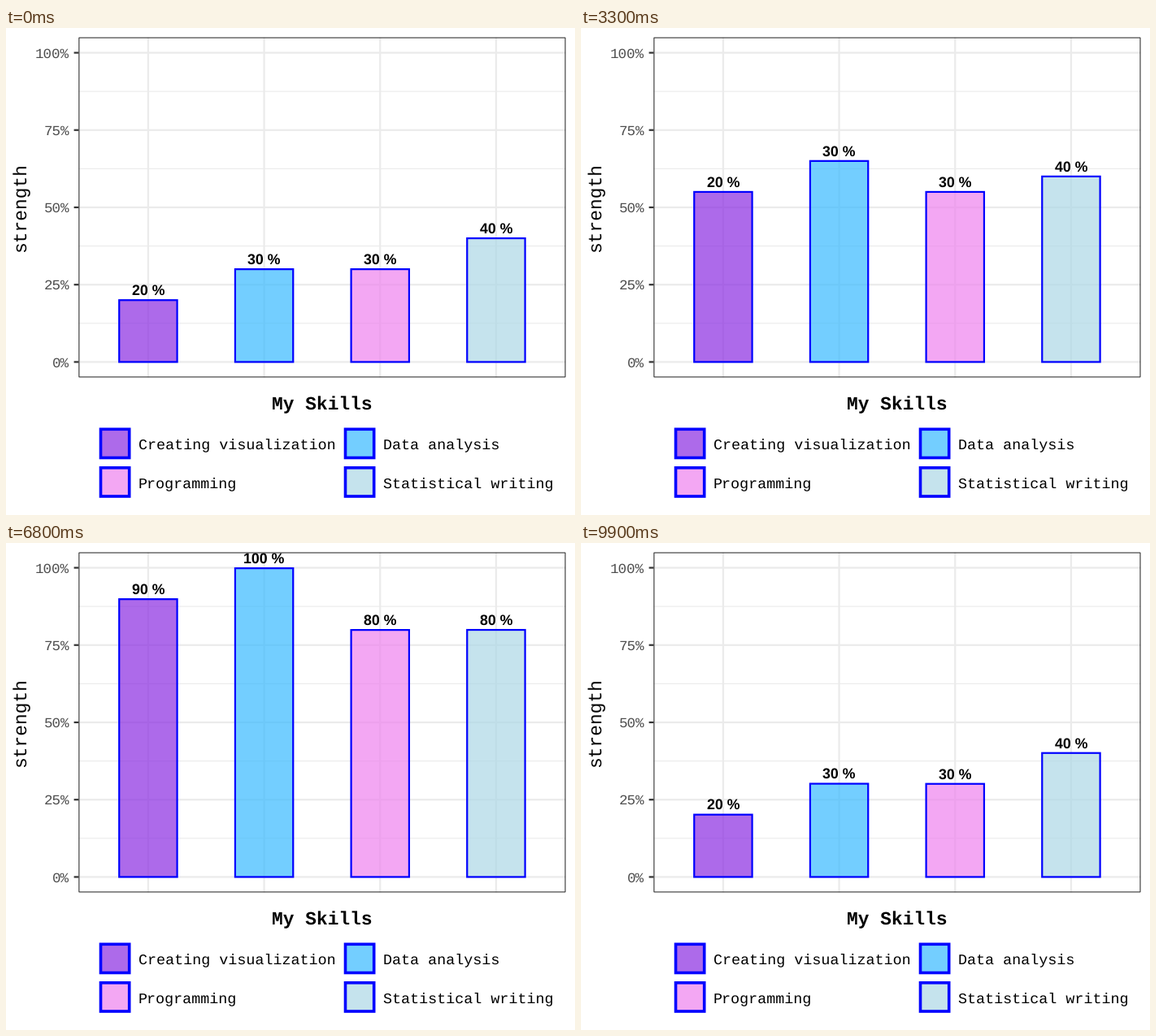
Recreate the animation shown at these times as a matplotlib script. Size 700 by 600 pixels, loop 10000 ms.

```python
import math

import matplotlib.pyplot as plt
from matplotlib.animation import FuncAnimation
from matplotlib.colors import to_rgba
from matplotlib.patches import Rectangle

WIDTH, HEIGHT, DPI = 700, 600, 150
FRAMES, INTERVAL = 100, 100
PX = 72 / DPI

LEFT, RIGHT, TOP, BOTTOM = 89.3, 688.54, 11.46, 430.5
STEP = (RIGHT - LEFT) / 4.2
LINE = 2.22 * PX
GRID = "#ebebeb"
MONO = "Liberation Mono"

SKILLS = [
    ("Creating visualization", "#8a2be2", 20, 90),
    ("Data analysis", "#38baff", 30, 100),
    ("Programming", "#ee82ee", 30, 80),
    ("Statistical writing", "#add8e6", 40, 80),
]

plt.rcParams["text.hinting"] = "none"
fig = plt.figure(figsize=(WIDTH / DPI, HEIGHT / DPI), dpi=DPI, facecolor="white")
ax = fig.add_axes([0, 0, 1, 1])
ax.set_xlim(0, WIDTH)
ax.set_ylim(HEIGHT, 0)
ax.axis("off")


def x_pos(index):
    return LEFT + (0.6 + index) * STEP


def y_pos(percent):
    return BOTTOM - (percent + 5) / 110 * (BOTTOM - TOP)


def line(xs, ys, color, width, zorder=1):
    ax.plot(xs, ys, color=color, lw=width, zorder=zorder,
            solid_capstyle="butt", snap=False)


def box(x, y, w, h, fill, edge, width, zorder=3):
    return ax.add_patch(Rectangle((x, y), w, h, facecolor=fill, edgecolor=edge,
                                  lw=width, joinstyle="miter", snap=False,
                                  zorder=zorder))


def text(x, y, string, size, family=MONO, **style):
    return ax.text(x, y, string, fontsize=size, family=family,
                   va="baseline", **style)


# Panel with grid, ticks and border
for percent in (12.5, 37.5, 62.5, 87.5):
    line([LEFT, RIGHT], [y_pos(percent)] * 2, GRID, LINE / 2)
for percent in range(0, 101, 25):
    y = y_pos(percent)
    line([LEFT, RIGHT], [y, y], GRID, LINE)
    line([LEFT - 5.7, LEFT], [y, y], "#333333", LINE)
    text(78, y + 5.9, f"{percent}%", 8.4, color="#4d4d4d", ha="right")
for index in range(4):
    line([x_pos(index)] * 2, [TOP, BOTTOM], GRID, LINE)
box(LEFT + 0.55, TOP + 0.55, RIGHT - LEFT - 1.1, BOTTOM - TOP - 1.1,
    "none", "#333333", LINE / 2, zorder=5)

# Titles
text((LEFT + RIGHT) / 2, 470, "My Skills", 11, weight="bold", ha="center")
text(24.5, (TOP + BOTTOM) / 2, "strength", 11, ha="center",
     rotation=90, rotation_mode="anchor")

# Bars and legend
bars, labels = [], []
panel = Rectangle((LEFT, TOP), RIGHT - LEFT, BOTTOM - TOP, transform=ax.transData)
for index, (name, color, low, high) in enumerate(SKILLS):
    fill = to_rgba(color, 0.7)
    bars.append(box(x_pos(index) - STEP / 4, y_pos(0), STEP / 2, 0,
                    fill, "blue", LINE))
    label = text(x_pos(index), 0, "", 8.54, "Liberation Sans",
                 weight="bold", ha="center", zorder=4)
    label.set_clip_path(panel)
    labels.append(label)

    row, column = divmod(index, 2)
    dx, dy = 301 * column, 47.5 * row
    box(116.5 + dx, 494.3 + dy, 35.2, 35.2, fill, "blue", 3.6 * PX)
    text(162.7 + dx, 518.3 + dy, name, 8.8)


def progress(frame):
    """Linear share of the way from the low state to the high state."""
    if frame <= 50:
        return max(0, (frame - 16) / 34)
    return 1 - max(0, (frame - 67) / 33)


def update(frame):
    share = progress(frame)
    eased = (1 - math.cos(math.pi * share)) / 2
    for bar, label, (_, _, low, high) in zip(bars, labels, SKILLS):
        top = y_pos(low + (high - low) * eased)
        bar.set_y(top)
        bar.set_height(y_pos(0) - top)
        label.set_y(top - 6.4)
        label.set_text(f"{high if share > 0.5 else low} %")
    return bars + labels


animation = FuncAnimation(fig, update, frames=FRAMES, interval=INTERVAL,
                          repeat=True, repeat_delay=0, blit=False)
plt.show()
```
